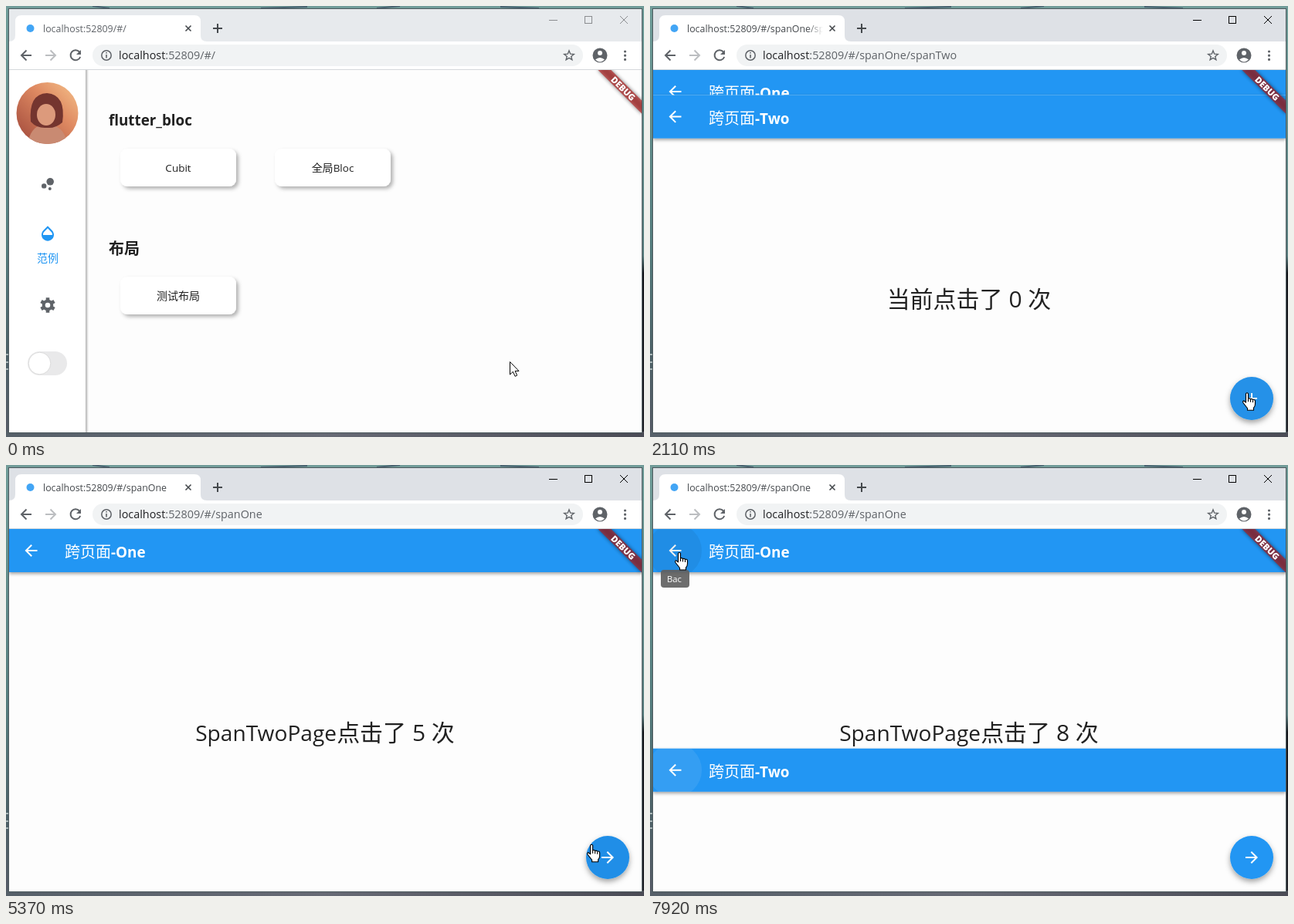
An HTML page that plays this animation: 826 by 559 pixels, repeating every 8 s.

```html
<!DOCTYPE html>
<html lang="zh">
<head>
<meta charset="utf-8">
<style>
html, body { margin: 0; width: 100%; height: 100%; overflow: hidden; }
svg { display: block; width: 826px; height: 559px; }
text { font-family: "Open Sans", "Noto Sans CJK SC", "Noto Sans CJK", sans-serif; white-space: pre; }
.ln { fill: none; stroke-width: 2; }
.mid { text-anchor: middle; }
.h { font-weight: bold; font-size: 18.8px; fill: #212121; }
.card { fill: #fff; filter: url(#cardShade); }
.label { font-size: 13.5px; fill: #212121; text-anchor: middle; }
.big { font-size: 28.1px; fill: #212121; text-anchor: middle; }
.cjk { font-size: 30px; }
.title { font-size: 18.9px; font-weight: bold; fill: #fff; }
.title .cn { font-size: 20px; font-weight: 500; }
</style>
</head>
<body>
<svg viewBox="0 0 826 559">
<defs>
  <linearGradient id="left" x2="0" y2="1">
    <stop offset="0" stop-color="#6f9c98"/><stop offset=".55" stop-color="#557d7e"/>
    <stop offset=".8" stop-color="#4d6268"/><stop offset="1" stop-color="#565b66"/>
  </linearGradient>
  <linearGradient id="right" x2="0" y2="1">
    <stop offset="0" stop-color="#6f9c98"/><stop offset=".58" stop-color="#5b7f80"/>
    <stop offset=".62" stop-color="#15171c"/><stop offset="1" stop-color="#24262c"/>
  </linearGradient>
  <linearGradient id="bottom">
    <stop offset="0" stop-color="#566069"/><stop offset=".5" stop-color="#676a75"/><stop offset="1" stop-color="#4a4b55"/>
  </linearGradient>
  <linearGradient id="fade"><stop offset="0" stop-color="#fff" stop-opacity="0"/><stop offset="1" stop-color="#fff"/></linearGradient>
  <linearGradient id="side"><stop offset="0" stop-opacity=".3"/><stop offset="1" stop-opacity="0"/></linearGradient>
  <linearGradient id="sunset" x1="1" y1="0" x2="0" y2="1">
    <stop offset="0" stop-color="#f6c48c"/><stop offset=".4" stop-color="#df8a62"/><stop offset="1" stop-color="#9c4438"/>
  </linearGradient>
  <filter id="cardShade" x="-20%" y="-40%" width="140%" height="190%">
    <feDropShadow dx="3" dy="3" stdDeviation="2.5" flood-opacity=".3"/>
  </filter>
  <filter id="fabShade" x="-40%" y="-40%" width="180%" height="190%">
    <feDropShadow dx="0" dy="3.5" stdDeviation="3.5" flood-opacity=".36"/>
  </filter>
  <filter id="barShade" x="-5%" y="-20%" width="110%" height="160%">
    <feDropShadow dx="0" dy="2" stdDeviation="2" flood-opacity=".38"/>
  </filter>
  <filter id="blur" x="-20%" y="-100%" width="140%" height="300%"><feGaussianBlur stdDeviation="2.5"/></filter>
  <clipPath id="view"><rect x="4" y="83" width="819" height="470"/></clipPath>
  <clipPath id="barClip"><rect x="4" y="83" width="819" height="56"/></clipPath>
  <clipPath id="tabClip"><rect x="48" y="16" width="176" height="26"/></clipPath>
  <clipPath id="face"><circle cx="53.5" cy="139" r="40"/></clipPath>
  <path id="arrow" d="M20 11H7.83l5.59-5.59L12 4l-8 8 8 8 1.41-1.41L7.83 13H20z"/>
  <g id="bar">
    <rect x="4" y="83" width="819" height="56" fill="#2196f3" filter="url(#barShade)"/>
    <use href="#arrow" x="20.5" y="99" fill="#fff"/>
  </g>
  <circle id="halo" cx="32" cy="111" r="35" clip-path="url(#barClip)"/>
</defs>

<!-- desktop -->
<rect width="826" height="559" fill="url(#left)"/>
<rect x="820" width="6" height="559" fill="url(#right)"/>
<rect y="552" width="826" height="7" fill="url(#bottom)"/>
<rect width="826" height="4" fill="#729c99"/>
<path d="M112 0l22 3M330 3l60-2M480 3l30-3M640 1l50 2" stroke="#48616f" stroke-width="2"/>
<path d="M0 452h4M0 462h4M0 471h4" stroke="#a9b6b8" stroke-width="2"/>
<rect x="3.5" y="3.5" width="820" height="550" fill="#fff" stroke="#4d5a5e"/>

<!-- browser -->
<rect id="strip" x="4" y="4" width="819" height="42"/>
<path d="M4 46q8 0 8-8V20q0-8 8-8H244q8 0 8 8V38q0 8 8 8z" fill="#fff"/>
<circle cx="31.5" cy="29" r="5" fill="#42a5f5"/>
<g clip-path="url(#tabClip)"><text id="tab" x="48" y="33.7" font-size="12.4"></text></g>
<rect id="tabFade" x="204" y="18" width="20" height="24" fill="url(#fade)"/>
<path d="M232.5 25.5l7 7m0-7l-7 7" class="ln" stroke="#45494d" style="stroke-width:1.6"/>
<path d="M268 29h12M274 23v12" class="ln" stroke="#45494d"/>
<g id="controls" class="ln" style="stroke-width:1">
  <path d="M703 18.5h11M795 13l10 10m0-10l-10 10"/><rect x="749.5" y="13.5" width="9" height="9"/>
</g>
<rect x="4" y="46" width="819" height="37" fill="#fff"/>
<rect x="4" y="82" width="819" height="1" fill="#d5d8db"/>
<rect x="112" y="50" width="635" height="28" rx="14" fill="#f1f3f4"/>
<g class="ln" stroke="#5f6368">
  <path d="M33 64H20m6.5-6.5L20 64l6.5 6.5"/>
  <path d="M51 64h13m-6.500-6.500L64 64l-6.500 6.500" stroke="#bcbec1"/>
  <path d="M95 59.500A6.500 6.500 0 1 0 96.200 66"/>
  <circle cx="130" cy="64" r="6.200" style="stroke-width:1.500"/>
  <path d="M130 63v4.500M130 60v1.600" style="stroke-width:1.600"/>
  <path id="star" style="stroke-width:1.400"/>
</g>
<path d="M97 57v6h-6z" fill="#5f6368"/>
<circle cx="769" cy="64" r="9.500" fill="#5f6368"/>
<circle cx="769" cy="61" r="3" fill="#fff"/><path d="M763 69.500q6-5 12 0q-6 6-12 0" fill="#fff"/>
<path d="M801.500 59v0M801.500 64.200v0M801.500 69.400v0" stroke="#5f6368" stroke-width="3.200" stroke-linecap="round"/>
<text x="146" y="69" font-size="14.400" fill="#202124">localhost<tspan id="path" fill="#5f6368"></tspan></text>

<g clip-path="url(#view)">
  <g id="home">
    <rect x="4" y="83" width="819" height="470" fill="#fdfdfd"/>
    <rect x="4" y="83" width="99" height="470" fill="#fff"/>
    <rect x="103" y="83" width="4" height="470" fill="url(#side)"/>
    <g clip-path="url(#face)">
      <rect x="13" y="99" width="81" height="81" fill="url(#sunset)"/>
      <path d="M28 180q3-22 18-26h14q17 5 19 26z" fill="#c98a72"/>
      <path d="M32 150q-3-36 21-37 25 2 20 38-9 8-20 7-13 1-21-8z" fill="#74352f"/>
      <ellipse cx="52" cy="141" rx="12" ry="14" fill="#dc9a7c"/>
    </g>
    <g fill="#5f6368">
      <circle cx="49.200" cy="233.400" r="3.200"/><circle cx="56.800" cy="237" r="2"/><circle cx="57.200" cy="227.800" r="4.800"/>
    </g>
    <path transform="translate(42 283)" fill="#2196f3" fill-rule="evenodd" d="M17.660 8L12 2.350 6.340 8C4.780 9.560 4 11.640 4 13.640s.78 4.110 2.340 5.670 3.610 2.350 5.660 2.350 4.100-.79 5.660-2.350S20 15.640 20 13.640 19.220 9.560 17.660 8zM6 14c.01-2 .62-3.270 1.760-4.400L12 5.270l4.240 4.380C17.380 10.770 17.990 12 18 14z"/>
    <text x="54" y="332" font-size="14" fill="#2196f3" class="mid">范例</text>
    <g stroke="#5f6368" fill="none">
      <circle cx="54" cy="388" r="5.300" stroke-width="4"/>
      <path id="teeth" stroke-width="4.600"/>
    </g>
    <rect x="28" y="448" width="51" height="31" rx="15.500" fill="#e9e9ea"/>
    <circle cx="43.500" cy="463.500" r="14.300" fill="#fff" filter="url(#knob)" stroke="#d4d4d4" stroke-width=".8"/>
    <text x="133" y="155" class="h">flutter_bloc</text>
    <text x="133" y="321.500" class="h" style="font-size:20px">布局</text>
    <rect x="148" y="185" width="150" height="49" rx="9" class="card"/>
    <rect x="348" y="185" width="150" height="49" rx="9" class="card"/>
    <rect x="148" y="351" width="150" height="49" rx="9" class="card"/>
    <text x="223" y="215" class="label">Cubit</text>
    <text x="423" y="215" class="label"><tspan font-size="14">全局</tspan>Bloc</text>
    <text x="223" y="381" class="label" style="font-size:14px">测试布局</text>
  </g>
  <g id="one">
    <rect x="4" y="83" width="819" height="470" fill="#fdfdfd"/>
    <use href="#bar"/><use id="haloOne" href="#halo" fill="#000" opacity=".05"/>
    <text x="76" y="120" class="title"><tspan class="cn">跨页面</tspan>-One</text>
    <text x="413" y="358" class="big">SpanTwoPage<tspan class="cjk">点击了 <tspan id="total"></tspan> 次</tspan></text>
  </g>
  <g id="two">
    <rect x="4" y="83" width="819" height="470" fill="#fdfdfd"/>
    <use href="#bar"/><use id="haloTwo" href="#halo"/>
    <text x="76" y="120" class="title"><tspan class="cn">跨页面</tspan>-Two</text>
    <text x="413" y="358" class="big"><tspan class="cjk">当前点击了 <tspan id="count"></tspan> 次</tspan></text>
  </g>
  <g id="fab">
    <circle cx="779" cy="509" r="28" fill="#2196f3" filter="url(#fabShade)"/>
    <circle id="fabHover" cx="779" cy="509" r="28" opacity=".05"/>
    <circle id="fabInk" cx="779" cy="509" r="28" fill="#fff"/>
    <use id="next" href="#arrow" transform="translate(791 521) rotate(180)" fill="#fff"/>
    <path id="plus" d="M772 509h14M779 502v14" class="ln" stroke="#fff"/>
  </g>
  <g id="tip">
    <rect x="14" y="136" width="37" height="23" rx="4" fill="#616161" opacity=".92"/>
    <text x="22" y="152" font-size="11.300" fill="#fff">Bac</text>
  </g>
  <g transform="translate(823 83) rotate(45)">
    <rect x="-40" y="28" width="80" height="12" opacity=".5" filter="url(#blur)"/>
    <rect x="-40" y="28" width="80" height="12" fill="#b71c1c" fill-opacity=".63"/>
    <text y="38.100" font-size="11.300" font-weight="800" fill="#fff" class="mid">DEBUG</text>
  </g>
</g>

<g id="pointer" fill="#fff" stroke="#000" stroke-linejoin="round">
  <path id="tipArrow" d="M.5.500V17l3.900-3.700 2.700 6 2.600-1.200-2.600-5.700H12z"/>
  <g id="hand">
    <path d="M-1.500 1.500q1.500-2 3 0V8q1.700-1 3 .7 1.700-.9 3 .7 2.700-.6 3 1.800V15q0 3-2 5v3H.500v-2.500L-5 13.500q-1-2.500 1-2.700L-1.500 13z"/>
    <path d="M1.500 8v4M4.500 9v3.500M7.500 10v3" fill="none"/>
  </g>
</g>
</svg>
<script>
const $ = id => document.getElementById(id);
const LOOP = 8000, SLIDE = 300, VIEW_H = 470;
const FAB = [779, 509], BACK = [32, 111];
// pointer stops: time, x, y
const STOPS = [
  [0, 652, 461], [70, 652, 461], [540, 425, 212], [1160, 425, 212], [1600, 773, 498],
  [1790, 773, 498], [2400, 773, 504], [3610, 773, 504], [3660, 757, 504], [3860, 757, 504],
  [4370, 46, 111], [4930, 46, 111], [5400, 766, 496], [5530, 769, 508], [6380, 769, 510],
  [6920, 769, 510], [7180, 166, 118], [7250, 118, 92], [7440, 38, 113], [LOOP, 38, 113]
];
const ROUTES = [[0, ""], [790, "spanOne"], [1830, "spanOne/spanTwo"], [4560, "spanOne"], [5650, "spanOne/spanTwo"], [7640, "spanOne"]];
const TAPS = [2360, 2820, 2980, 3200, 3420, 6380, 6560, 6750];
const PRESSES = [1770, 5590, ...TAPS];
const PUSH_ONE = 870, PUSHES = [1890, 5700], POPS = [4640, 7687.5];

const clamp = v => Math.max(0, Math.min(1, v));
const ease = v => v * v * (3 - 2 * v);
const progress = (t, start, span = SLIDE) => clamp((t - start) / span);
const show = (id, on) => $(id).style.display = on ? "" : "none";
const near = (p, c, r) => Math.hypot(p[0] - c[0], p[1] - c[1]) < r;
const shift = (id, f) => {
  show(id, f < 1);
  $(id).setAttribute("transform", `translate(0 ${f * VIEW_H})`);
};
const rise = (t, start) => (1 - progress(t, start)) ** 2;

function pointerAt(t) {
  const i = STOPS.findIndex(s => s[0] > t);
  const a = STOPS[i - 1], b = STOPS[i];
  const k = ease((t - a[0]) / (b[0] - a[0]));
  return [a[1] + (b[1] - a[1]) * k, a[2] + (b[2] - a[2]) * k];
}

function ink(t) {
  return Math.max(...PRESSES.map(p => t < p ? 0 : .15 * progress(t, p, 70) * (1 - progress(t, p + 130, 250))));
}

function render(t) {
  const active = t >= 620;
  $("strip").setAttribute("fill", active ? "#dee1e6" : "#e7eaed");
  $("controls").setAttribute("stroke", active ? "#000" : "#8b8d90");
  $("tab").setAttribute("fill", active ? "#45494d" : "#5f6368");

  const route = ROUTES.filter(r => r[0] <= t).pop()[1];
  $("path").textContent = ":52809/#/" + route;
  $("tab").textContent = "localhost:52809/#/" + route;
  show("tabFade", route.includes("/"));

  const round = t < PUSHES[1] ? 0 : 1;
  const popped = t >= POPS[round];
  const onTwo = t >= PUSHES[round] && !popped;
  const drop = popped ? progress(t, POPS[round]) ** 2 : rise(t, PUSHES[round]);
  const oneTop = rise(t, PUSH_ONE);
  shift("one", oneTop);
  shift("two", drop);
  shift("fab", oneTop);
  show("next", !onTwo);
  show("plus", onTwo);

  const total = TAPS.filter(p => p <= t).length;
  // the first page keeps its old tally until the second page covers it
  $("total").textContent = total;
  $("count").textContent = round ? total - 5 : total;

  const p = pointerAt(t), ready = t > PUSH_ONE + SLIDE;
  const onFab = ready && near(p, FAB, 28);
  const onBack = ready && near(p, BACK, 35);
  const onCard = !ready && p[0] > 348 && p[0] < 498 && p[1] > 185 && p[1] < 234;
  show("fabHover", onFab);
  $("fabInk").setAttribute("opacity", ink(t));
  show("haloOne", onBack);
  show("haloTwo", onBack || popped);
  $("haloTwo").setAttribute("fill", popped ? "#fff" : "#000");
  $("haloTwo").setAttribute("opacity", popped ? .08 : .05);
  $("tip").setAttribute("opacity", progress(t, 7690, 150));

  const hand = onFab || onBack || onCard;
  show("hand", hand);
  show("tipArrow", !hand);
  $("pointer").setAttribute("transform", `translate(${p[0]} ${p[1]})`);
}

const polar = (cx, cy, r, a) => [cx + r * Math.sin(a), cy - r * Math.cos(a)].join(" ");
$("star").setAttribute("d", "M" + Array.from({ length: 10 }, (_, i) =>
  polar(729, 64.5, i % 2 ? 2.9 : 6.6, i * Math.PI / 5)).join("L") + "z");
$("teeth").setAttribute("d", Array.from({ length: 6 }, (_, i) =>
  `M${polar(54, 388, 5, i * Math.PI / 3)}L${polar(54, 388, 9.8, i * Math.PI / 3)}`).join(""));
$("tipArrow").parentNode.querySelector("#hand").setAttribute("stroke-width", 1.1);

const begin = performance.now();
function tick() {
  render((performance.now() - begin) % LOOP);
  requestAnimationFrame(tick);
}
tick();
</script>
</body>
</html>
```
